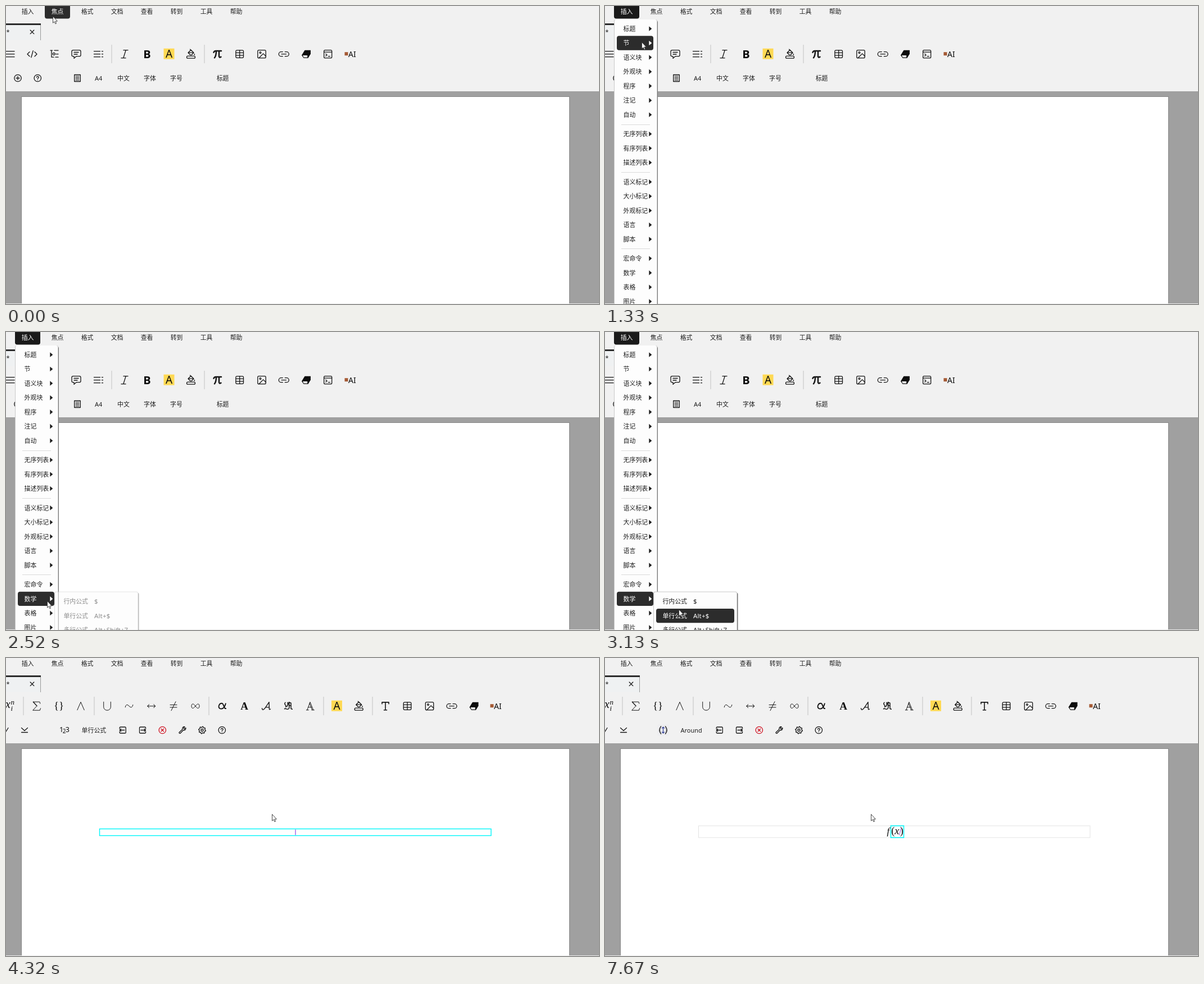
Write an HTML page that moves like this. It is 1055x531 px and loops after 8 s.

```html
<!DOCTYPE html>
<html lang="zh-CN">
<head>
<meta charset="utf-8">
<title>插入公式</title>
<style>
html, body { margin: 0; width: 100%; height: 100%; overflow: hidden; background: #f1f1f1; }
svg { display: block; width: 1055px; height: 531px; }
text { font: 10.9px "Noto Sans", "Noto Sans CJK SC", "Noto Sans CJK", sans-serif; fill: #1c1c1c; }
.icon { fill: none; stroke: #151515; stroke-width: 1.3; stroke-linejoin: round; stroke-linecap: round; }
.icon text, .icon .solid { fill: #0c0c0c; stroke: none; }
.icon .thin { stroke-width: 1; }
.icon .serif, .math { font-family: "Liberation Serif", "Noto Serif", serif; }
.math { fill: #111; }
.on text { fill: #fff; }
.on .tri { fill: #fff; }
.tri { fill: #1c1c1c; }
</style>
</head>
<body>
<svg id="stage" viewBox="0 0 1055 531"></svg>
<script>
const LOOP = 8000, DARK = '#2c2c2c', ROW1 = 86, ROW2 = 128.5;

const text = (x, y, s, extra = '') => `<text x="${x}" y="${y}" ${extra}>${s}</text>`;
const rect = (x, y, w, h, extra = '') => `<rect x="${x}" y="${y}" width="${w}" height="${h}" ${extra}/>`;
const path = (d, extra = '') => `<path d="${d}" ${extra}/>`;
const dot = (x, y, r, extra = '') => `<circle cx="${x}" cy="${y}" r="${r}" ${extra}/>`;
const icon = (x, y, body) => `<g class="icon" transform="translate(${x} ${y})">${body}</g>`;
const glyph = (s, size, y, css = '') =>
  text(0, y, s, `class="serif" text-anchor="middle" style="font-size:${size}px;${css}"`);
const sans = (s, size, y, css = '') =>
  text(0, y, s, `text-anchor="middle" style="font-size:${size}px;${css}"`);
const divider = x => rect(x, 69, 1, 33, 'fill="#c2c2c2"');

const art = {
  burger: path('M-10 -5H7M-10 0H7M-10 5H7'),
  code: path('M-4.5 -4L-8.5 0L-4.5 4M4.5 -4L8.5 0L4.5 4M1.7 -6L-1.7 6'),
  tree: path('M-7 -6.5H-3.5M-5 -6.5V5.5H-1M0 -6.5H7M3 0H7M2 5.5H7') + dot(-0.8, -0.3, 2),
  comment: path('M-5.5 -7H5.5Q8 -7 8 -4.5V1.5Q8 4 5.5 4H0L-4 7.5V4H-5.5Q-8 4 -8 1.5V-4.5Q-8 -7 -5.5 -7ZM-4 -3.2H4M-4 0.3H2'),
  list: path('M-8 -5H3M-8 0H3M-8 5H3M6 -5H8M6 0H8M6 5H8'),
  italic: path('M-2 -7H6M-6 7H2M2.2 -7L-2.2 7'),
  bold: sans('B', 20, 7.2, 'font-weight:800'),
  mark: rect(-9.5, -10, 19, 19, 'style="fill:#ffd954;stroke:none"') + sans('A', 19, 6.6, 'font-weight:500'),
  bucket: path('M-5 -2.5L0 -7.5L5 -2.5L1 1.5H-1ZM-5 -2.5H5M-1.5 -8.5L1 -6') +
    path('M6.3 -1.2Q8 1.5 6.3 1.8Q4.6 1.5 6.3 -1.2', 'class="solid"') + rect(-7.5, 3.5, 15, 4, 'rx="2"'),
  pi: path('M-6.5 -3Q-5.5 -5.8 -3 -5.8H7M-2 -5.5Q-2 3 -5 6.5M3 -5.5V3.5Q3 7 6.5 5', 'style="stroke-width:2.5"'),
  table: rect(-6.8, -6.8, 13.6, 13.4, 'rx="2"') + path('M-6.8 -2.4H6.8M-6.8 2.2H6.8M0 -6.8V6.6'),
  image: rect(-7.2, -7, 14.4, 14, 'rx="2"') + dot(-2.5, -2.6, 1.4) + path('M-5 7L2.6 -0.8L7.2 3.6'),
  link: path('M-2 -4H-5A4 4 0 0 0 -5 4H-2M2 -4H5A4 4 0 0 1 5 4H2M-4.2 0H4.2'),
  eraser: path('M-2.5 -7H8V-0.5L3.5 7H-4.5L-8 2Z', 'class="solid"') + path('M-6 2.2H2.2V5.7H-4.2Z', 'style="fill:#fff;stroke:none"'),
  term: rect(-7, -7, 14, 14, 'rx="2"') + path('M-7 -3.6H7M-3.8 -0.4L-1.6 1.6L-3.8 3.6M0.5 4H3.8'),
  ai: rect(-9.5, -3.5, 6, 6, 'style="fill:#a55a35;stroke:none"') + text(-3, 5, 'AI', 'style="font-size:14px"'),
  plus: dot(0, 0, 6.2) + path('M-3 0H3M0 -3V3'),
  help: dot(0, 0, 6.2) + path('M-1.9 -1.3Q-1.7 -3.2 0 -3.2Q1.9 -3.2 1.9 -1.6Q1.9 -0.5 0 0.7V1.2M0 3.2V3.3'),
  page: rect(-5.3, -6, 10.6, 12) + path('M-3 -3.4H3M-3 -1H3M-3 1.2H3M-3 3.6H3', 'class="thin"'),
  script: text(-9, 3, 'x', 'class="serif" style="font-size:20px;font-style:italic"') +
    text(0.5, -2.5, 'n', 'class="serif" style="font-size:13px;font-style:italic"') +
    text(0.5, 8.5, 'i', 'class="serif" style="font-size:13px;font-style:italic"'),
  sum: path('M6.3 -4.5L5.4 -7.5H-6.5L0.5 -0.3L-6.8 7.5H5.8L7 4', 'class="thin"') + path('M-6 -7.5L0.5 -0.3'),
  braces: text(-8.8, 5.2, '{', 'class="serif" style="font-size:19px"') + text(0.2, 5.2, '}', 'class="serif" style="font-size:19px"'),
  wedge: path('M-6.2 7L0 -7.2L6.2 7', 'class="thin"'),
  cup: path('M-6.3 -7.5V1.5A6.3 6 0 0 0 6.3 1.5V-7.5', 'class="thin"'),
  sim: path('M-6.8 2C-5.5 -4.5 -2.5 -2.5 0 0S5.5 4 6.8 -2.2', 'class="thin"'),
  arrows: path('M-7 0H7M-4.2 -3Q-5 -0.8 -7.2 0Q-5 0.8 -4.2 3M4.2 -3Q5 -0.8 7.2 0Q5 0.8 4.2 3', 'class="thin"'),
  neq: path('M-6 -2.2H6M-6 2.2H6M4 -8L-4 8', 'class="thin"'),
  infinity: path('M0 0C-2 -3 -3.5 -3.8 -4.7 -3.8C-7.8 -3.8 -7.8 3.8 -4.7 3.8C-2 3.8 2 -3.8 4.7 -3.8C7.8 -3.8 7.8 3.8 4.7 3.8C3.5 3.8 2 3 0 0', 'class="thin"'),
  alpha: path('M6.5 -4.5C4 5 -1 5.5 -3.5 4.5C-8 2 -5 -5 -0.5 -5C4 -5 2.5 5.5 6.8 4.3', 'style="stroke-width:1.9"'),
  boldA: glyph('A', 19, 6, 'font-weight:700'),
  scriptA: path('M-7.5 4C-7 8.5 -3.5 6 -1 2L5 -7L5.4 5.5Q6 6.6 7.5 5.3M-1.5 2.2H5', 'style="stroke-width:1.4"'),
  frakA: path('M-5 -6.5C-9 -3 -2 -2 -4.5 1.5M-6.5 5C-4 2.5 -2.5 8 1 4.5C4 1 -1 -4 1.5 -7L5 -5.5V4.5L7.3 5.5M-1 -6.5Q0 -2 -2.5 1M1.8 -6.2V3.5M1.8 -1H5', 'style="stroke-width:1.5"'),
  bbA: path('M-7 7H-3M2.5 7H7M-5.5 7L-0.3 -7.2L5.5 7M-1.2 -4.8L3.5 7M-3.6 2H2', 'class="thin"'),
  bigT: path('M-6 -4V-6.8H6V-4M0 -6.8V7M-2.5 7H2.5', 'style="stroke-width:1.6"'),
  check: path('M-3 1L0 4L5 -4'),
  chevron: path('M-5.5 -4L0 1L5.5 -4M-5.5 4H5.5'),
  digits: text(-8.5, 3.5, '1', 'style="font-size:12.5px"') + text(-2.8, 5.5, '2', 'style="font-size:10px"') + text(2.3, 3.5, '3', 'style="font-size:12.5px"'),
  around: path('M-4 -6.5Q-9 0 -4 6.5M4 -6.5Q9 0 4 6.5', 'style="stroke:#444;stroke-width:1.8"') +
    path('M0 -5.5V5.5M-2 -3.5L0 -5.5L2 -3.5M-2 3.5L0 5.5L2 3.5', 'style="stroke:#3d4a9c"'),
  before: path('M-5.5 -2.5V-4Q-5.5 -5.5 -4 -5.5H4Q5.5 -5.5 5.5 -4V4Q5.5 5.5 4 5.5H-4Q-5.5 5.5 -5.5 4V2.5M3 0H-5.5M-3 -2.3L-5.5 0L-3 2.3'),
  after: path('M5.5 -2.5V-4Q5.5 -5.5 4 -5.5H-4Q-5.5 -5.5 -5.5 -4V4Q-5.5 5.5 -4 5.5H4Q5.5 5.5 5.5 4V2.5M-3 0H5.5M3 -2.3L5.5 0L3 2.3'),
  remove: `<g style="stroke:#cf1020">${dot(0, 0, 6.2)}${path('M-2.3 -2.3L2.3 2.3M2.3 -2.3L-2.3 2.3')}</g>`,
  wrench: path('M-5.8 4L0 -1.5C-1 -4.5 1.5 -6.6 4 -5.8L1.8 -3.4L3.4 -1.8L5.8 -4C6.6 -1.5 4.5 1 1.5 0L-4 5.8Q-5.2 6.2 -5.8 5.4Q-6.3 4.7 -5.8 4Z'),
  gear: path(gearPath()) + dot(0, 0, 2)
};

function gearPath() {
  const pts = [];
  for (let i = 0; i < 32; i++) {
    const a = (i + 0.5) * Math.PI / 16, r = i % 4 < 2 ? 6.3 : 4.9;
    pts.push((r * Math.cos(a)).toFixed(2) + ' ' + (r * Math.sin(a)).toFixed(2));
  }
  return 'M' + pts.join('L') + 'Z';
}

const place = (names, xs, y) => names.split(' ').map((n, i) => icon(xs[i], y, art[n])).join('');

// Menu data: '-' is a separator
const bar = ['插入', '焦点', '格式', '文档', '查看', '转到', '工具', '帮助'];
const items = '标题 节 语义块 外观块 程序 注记 自动 - 无序列表 有序列表 描述列表 - 语义标记 大小标记 外观标记 语言 脚本 - 宏命令 数学 表格 图片'.split(' ');
const subItems = [['行内公式', '$'], ['单行公式', 'Alt+$'], ['多行公式', 'Alt+Shift+7']];

const barHtml = bar.map((s, i) => `<g id="bar${i}">` +
  rect(16 + i * 53, -6, 45, 28.5, 'rx="4" fill="none"') + text(27.7 + i * 53, 14, s) + '</g>').join('');

const centers = {};
let menuHtml = '', cy = 40.5;
for (const s of items) {
  if (s === '-') {
    menuHtml += rect(29, Math.round(cy - 8.6), 51, 1, 'fill="#dadada"');
    cy += 8.8;
    continue;
  }
  centers[s] = cy;
  menuHtml += `<g id="m-${s}">` + rect(21, cy - 12.7, 65, 25.4, 'rx="4" fill="none"') +
    text(32.6, cy + 4.2, s) + path(`M78.3 ${cy - 4.3}L83.3 ${cy}L78.3 ${cy + 4.3}Z`, 'class="tri"') + '</g>';
  cy += 25.53;
}

const subHtml = subItems.map(([name, key], i) => {
  const y = 480 + i * 25.5;
  return `<g id="s${i}">` + rect(91, y - 12.5, 139, 25.3, 'rx="4" fill="none"') +
    text(102.4, y + 4.2, name) + text(157, y + 4.2, key, 'style="font-size:11.4px;letter-spacing:.2px"') + '</g>';
}).join('');

const textBar =
  place('burger code tree comment list italic bold mark bucket pi table image link eraser term ai',
    [8, 46.5, 86, 125, 164.5, 211, 251, 290, 329, 376, 415.7, 455, 494.3, 534, 572.7, 612], ROW1 - 0.3) +
  [187.5, 352.5].map(divider).join('') +
  place('plus help page', [21, 56.3, 127], ROW2) +
  [[158, 'A4'], [198, '中文'], [245, '字体'], [292, '字号'], [374.7, '标题']].map(([x, s]) => text(x, 133, s)).join('');

const mathBar =
  place('script sum braces wedge cup sim arrows neq infinity alpha boldA scriptA frakA bbA mark bucket bigT table image link eraser ai',
    [8, 54.5, 93.7, 133, 180, 219, 258.7, 298, 337, 384.3, 424, 463, 502, 541.3, 588.5, 627.7, 675, 714, 753.5, 793, 832.5, 871], ROW1 - 0.3) +
  [30.5, 156.5, 360.5, 564.5, 651.5].map(divider).join('') +
  place('check chevron', [-1, 33], ROW2);
const tools = place('before after remove wrench gear help', [207.7, 243, 278.3, 314, 349, 384.3], ROW2);

document.getElementById('stage').innerHTML =
  rect(0, 0, 1055, 531, 'fill="#f1f1f1"') +
  rect(0, 152, 1055, 378, 'fill="#a0a0a0"') +
  rect(27, 161, 976, 369, 'fill="#868686"') + rect(28, 162, 974, 368, 'fill="#fff"') +
  rect(0, 530, 1055, 1, 'fill="#ececec"') +
  rect(0, 34, 61, 27, 'fill="#eff1f2"') + rect(0, 31, 62, 3, `fill="${DARK}"`) + rect(61, 34, 1, 27, 'fill="#999"') +
  text(0.5, 50, '*') + icon(46.5, 46.3, path('M-3.3 -3.3L3.3 3.3M3.3 -3.3L-3.3 3.3')) +
  `<g id="textBar">${textBar}</g>` +
  `<g id="mathBar">${mathBar}<g id="lineCtx">${icon(103.5, ROW2, art.digits)}${text(134.6, 133, '单行公式')}</g>` +
  `<g id="aroundCtx">${rect(93, 118, 21, 21, 'rx="3" fill="#eeeef0"')}${icon(103.5, ROW2, art.around)}${text(134.6, 132.7, 'Around')}</g>` +
  `<g id="tools">${tools}</g></g>` +
  `<g id="formula"></g>` + barHtml +
  `<g id="menu">${rect(18, 26, 76, 520, 'rx="3" fill="#777"')}${rect(16, 24, 77, 520, 'rx="3" fill="#c9c9c9"')}${rect(17, 24, 75, 520, 'rx="3" fill="#fdfdfd"')}${menuHtml}</g>` +
  `<g id="sub">${rect(88, 464.5, 148.5, 90, 'rx="3" fill="#777"')}${rect(86, 462.5, 149, 90, 'rx="3" fill="#c9c9c9"')}${rect(87, 463.5, 147.5, 90, 'rx="3" fill="#fdfdfd"')}${subHtml}</g>` +
  dot(0.5, 0.5, 10.3, 'id="click" fill="#f2e200" fill-opacity=".58"') +
  path('M.5 .5V12.2L3.1 9.8L4.9 13.8L6.6 13L4.9 9.1H8.4Z', 'id="mouse" fill="#fff" stroke="#333" stroke-width=".9"');

const $ = id => document.getElementById(id);
const show = (id, alpha) => {
  $(id).style.display = alpha ? '' : 'none';
  $(id).style.opacity = +alpha;
};
const lit = (id, color) => {
  $(id).classList.toggle('on', !!color);
  $(id).firstChild.setAttribute('fill', color || 'none');
};

// Moves happen in even steps: start, end, count
const moves = [[70, 330, 5], [1210, 1980, 12], [2050, 2790, 10], [2860, 3320, 8], [3980, 4320, 6]];
const track = [[0, 83, 18], [330, 47, 13], [1140, 47, 13], [1350, 74, 90], [1630, 113, 350], [1840, 93, 497],
  [1910, 87, 498], [1980, 78, 496], [2132, 66, 481], [2790, 79, 478], [2860, 92, 478], [2991, 118, 482],
  [3123, 131, 494], [3320, 135, 500], [3912, 135, 500], [4320, 473, 278]];

function pointer(t) {
  for (const [a, b, n] of moves) {
    if (t < a) break;
    const d = (b - a) / (n - 1);
    t = t >= b ? Math.max(b, t) : a + Math.floor((t - a) / d + 1e-6) * d;
    if (t < b) break;
  }
  // Rest between moves until the next one begins
  const last = moves.filter(m => t >= m[1]).pop();
  if (last && !moves.some(m => t >= m[0] && t < m[1])) t = last[1];
  if (t < moves[0][0]) t = 0;
  const i = track.findIndex(k => k[0] > t);
  if (i < 0) return track[track.length - 1].slice(1);
  const [t0, x0, y0] = track[i - 1], [t1, x1, y1] = track[i], p = (t - t0) / (t1 - t0);
  return [Math.round(x0 + (x1 - x0) * p), Math.round(y0 + (y1 - y0) * p)];
}

const frame = (x, y, w, h, color, width) =>
  rect(x, y, w, h, `fill="none" stroke="${color}" stroke-width="${width}"`);
const math = (x, y, s, style, size) =>
  text(x, y, s, `class="math" style="font-size:${size}px;font-style:${style}"`);
const caret = (d, color) => path(d, `fill="none" stroke="${color}" stroke-width="1.2"`);

function formula(t) {
  const cyan = '#00f6fa';
  if (t < 3710) return '';
  if (t < 5930) return frame(166.5, 304.5, 696.5, 12, cyan, 1.4) + caret('M515 305.5V315.5', '#8b45e8');
  if (t < 6910) return frame(166.5, 300, 696.5, 19.3, cyan, 1.4) +
    math(513.5, 313.6, 'f', 'italic', 17) + caret('M517.3 319L522.3 300.5', '#e63be6');
  const typed = t >= 7670, shift = typed ? 0 : 4.7, w = typed ? 23 : 13.6, left = 508.5 + shift;
  return frame(166.5, 299, 696.5, 21, '#e3e3e3', 1) + frame(left, 299, w, 21, cyan, 1.5) +
    math(501.5 + shift, 313.6, 'f', 'italic', 17) +
    math(left + 0.8, 314.2, '(', 'normal', 18.5) + math(left + w - 6.8, 314.2, ')', 'normal', 18.5) +
    (typed ? math(515.2, 313.8, 'x', 'italic', 18.5) + caret('M523.6 315.5L526.8 303.5', '#b06be0')
           : caret(`M${left + w / 2} 303V316`, '#8b45e8'));
}

let drawn;
function render(t) {
  const [x, y] = pointer(t);
  $('mouse').setAttribute('transform', `translate(${x} ${y})`);
  $('click').setAttribute('transform', `translate(${x} ${y})`);
  show('click', (t >= 550 && t < 740) || (t >= 3520 && t < 3710));

  const fade = t < 615 ? 0 : t < 680 ? 0.45 : t < 740 ? 0.85 : t < 3710 ? 1 : t < 3790 ? 0.4 : 0;
  const subFade = t < 2460 ? 0 : t < 2540 ? 0.5 : t < 2625 ? 0.85 : fade;
  show('menu', fade);
  show('sub', subFade);

  const pressed = t >= 550 && t < 3710;
  lit('bar0', pressed ? '#1a1a1a' : y < 23 && x >= 16 && x < 61 ? DARK : '');
  lit('bar1', !pressed && y < 23 && x >= 69 && x < 114 ? DARK : '');
  for (const s in centers) {
    const over = x >= 17 && x < 92 && Math.abs(y - centers[s]) < 12.7;
    lit('m-' + s, (subFade ? s === '数学' : over) ? DARK : '');
  }
  subItems.forEach((_, i) => lit('s' + i, subFade && x >= 91 && Math.abs(y - 480 - i * 25.5) < 12.7 ? DARK : ''));

  const mathMode = t >= 3980, inside = t >= 7260;
  show('textBar', !mathMode);
  show('mathBar', mathMode);
  show('lineCtx', !inside);
  show('aroundCtx', inside);
  $('tools').setAttribute('transform', `translate(${inside ? -4 : 0} 0)`);

  const body = formula(t);
  if (body !== drawn) $('formula').innerHTML = drawn = body;
}

const start = performance.now();
function tick() {
  render((performance.now() - start) % LOOP);
  requestAnimationFrame(tick);
}
tick();
</script>
</body>
</html>
```
